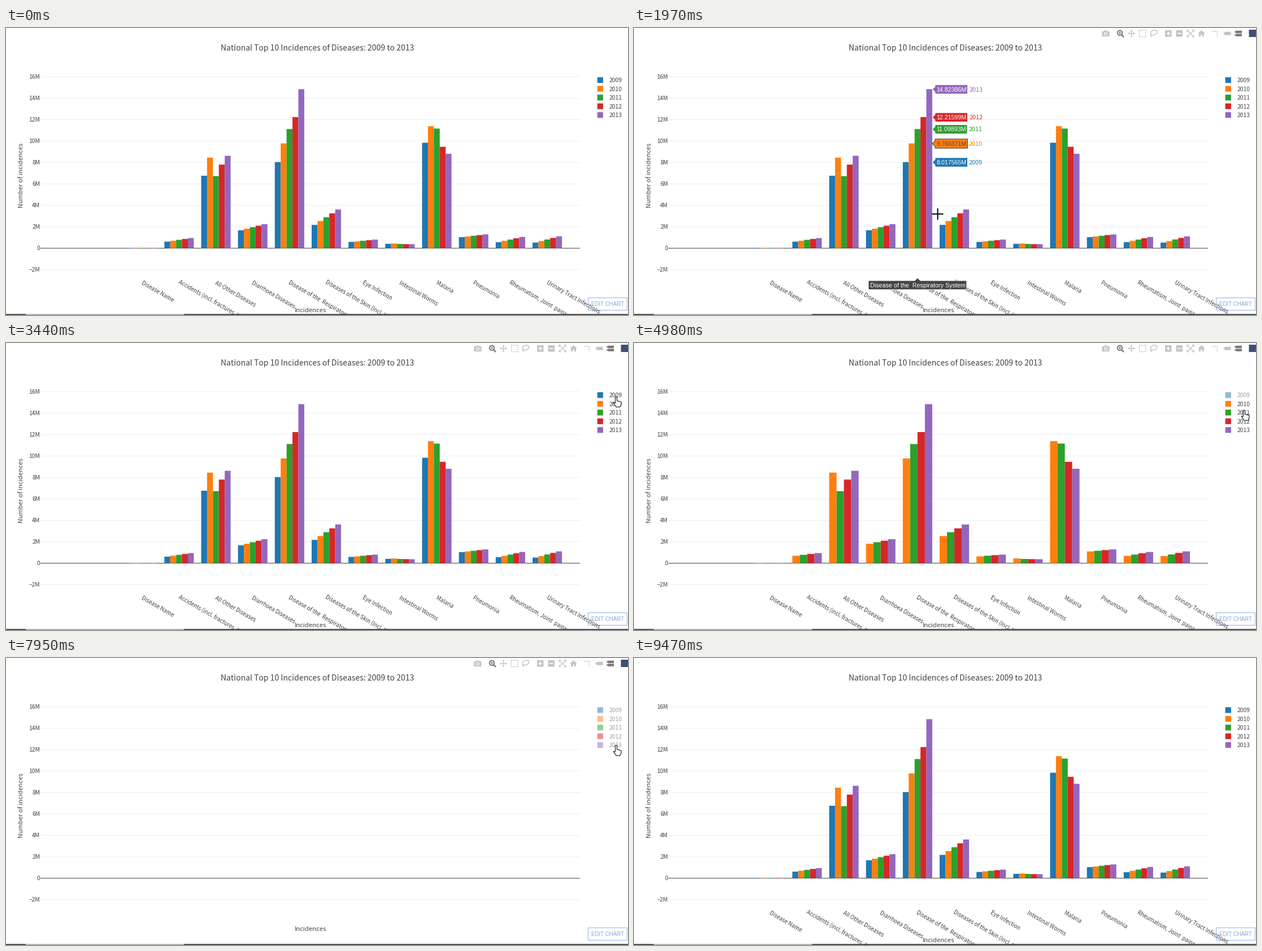
Animation of 1101 by 509 pixels, one loop 9520 ms. Source, as a matplotlib script:

```python
import numpy as np
import matplotlib.pyplot as plt
from matplotlib.animation import FuncAnimation
from matplotlib.patches import Circle, Ellipse, Polygon, Rectangle

W, H, DPI = 1101, 509, 64
LOOP, STEP = 9520, 40
PT = 72 / DPI  # points per pixel
SANS, ARIAL = "Noto Sans CJK JP", "Liberation Sans"
INK, GRAY, DARK = "#444444", "#c4c4c4", "#777777"
plt.rcParams["path.snap"] = False

YEARS = range(2009, 2014)
COLORS = ["#1f77b4", "#ff7f0e", "#2ca02c", "#d62728", "#9467bd"]

# Millions of cases: evenly spaced key readings from the first to the last year.
READINGS = {
    "Disease Name": [.002009, .002013],
    "Accidents (incl. fractures, burns)": [.591306, .921844],
    "All Other Diseases": [6.743128, 8.431507, 6.704392, 7.782615, 8.602943],
    "Diarrhoea Diseases": [1.652147, 2.220863],
    "Disease of the  Respiratory System":
        [8.017565, 9.760371, 11.09893, 12.21599, 14.82386],
    "Diseases of the Skin (Incl. Ulcers)": [2.152718, 3.591426],
    "Eye Infection": [.562853, .781249],
    "Intestinal Worms": [.387066, .419298, .374886, .357844, .349632],
    "Malaria": [9.823741, 11.36582, 11.14396, 9.442817, 8.792564],
    "Pneumonia": [1.013492, 1.262835],
    "Rheumatism, Joint  pains etc": [.541627, 1.024913],
    "Urinary Tract Infections": [.503174, 1.082356],
}
NAMES = list(READINGS)
VALUES = [np.interp(np.linspace(0, 1, 5), np.linspace(0, 1, len(keys)), keys)
          for keys in READINGS.values()]

X0, PITCH, GROUP = 241.2, 65.17, 52.1
Y0, PER_M = 390.5, 19
LEFT, RIGHT, TOP, BOTTOM = 61, 1016, 87, 429
LEGEND_Y, LEGEND_PITCH = 92.3, 15.47

ENTER, LEAVE = 450, 9070
HIDE_AT = [3920, 5140, 5860, 6940, 7950]
RESTORE = 8150
HOVER_LAG = 100

# Pointer over the chart: time, x, y. In the legend it steps down instead.
TOUR = np.array([
    (450, 1070, 500), (900, 515, 238), (1030, 402, 243), (1390, 343, 299),
    (1510, 361, 303), (1710, 361, 303), (2200, 670, 350), (2390, 687, 359),
    (2640, 812, 330), (3440, 1080, 95), (8150, 1080, 155), (8450, 940, 143),
    (8750, 957, 380), (9070, 962, 520),
])
LEGEND_STEPS = [4450, 4900, 6000, 7070, 7950]

HAND = np.array([(-1.5, 0), (1.5, 0), (1.5, 7), (9, 9), (9, 13), (7, 18),
                 (0, 18), (-5, 10.5), (-1.5, 11)])
ARROW = np.array([(0, 0), (0, 15), (4, 12), (10, 11)])

fig = plt.figure(figsize=(W / DPI, H / DPI), dpi=DPI, facecolor="white")
ax = fig.add_axes([0, 0, 1, 1])
ax.set_xlim(0, W)
ax.set_ylim(H, 0)
ax.axis("off")


def text(x, y, s, px, color=INK, font=SANS, z=4, **kw):
    return ax.text(x, y, s, fontsize=px * PT, color=color, family=font,
                   va="baseline", zorder=z, **kw)


def line(xs, ys, color, px=1, z=1, **kw):
    return ax.plot(xs, ys, color=color, lw=px * PT, zorder=z,
                   solid_capstyle="butt", **kw)[0]


def add(kind, *args, fill="none", edge="none", px=0, z=5, **kw):
    return ax.add_patch(kind(*args, fc=fill, ec=edge, lw=px * PT, zorder=z,
                             **kw))


def box(x, y, w, h, fill, z=5, **kw):
    return add(Rectangle, (x, y), w, h, fill=fill, z=z, **kw)


def shape(points, fill, edge="none", px=0, z=5):
    return add(Polygon, points, fill=fill, edge=edge, px=px, z=z,
               joinstyle="miter")


def cross(x, y, r, color, px, z):
    return [line([x - r, x + r], [y, y], color, px, z),
            line([x, x], [y - r, y + r], color, px, z)]


def ypix(v):
    return Y0 - v * PER_M


def center(group):
    return X0 + PITCH * group


def draw_frame_of_chart():
    text(551.5, 39.6, "National Top 10 Incidences of Diseases: 2009 to 2013",
         14, ha="center")
    text(30.5, 261.5, "Number of incidences", 11.3, ha="center", rotation=90,
         rotation_mode="anchor")
    for m in range(-2, 17, 2):
        y = ypix(m)
        line([LEFT, RIGHT], [y, y], "#eeeeee" if m else INK)
        label = f"{m}M".replace("-", "\u2013") if m else "0"
        text(60.3, y + 3.8, label, 10.3, ha="right")
    box(1030.5, 478.5, 69, 22, "none", 3.5, edge="#8fb3e8", px=1)
    text(1065, 493, "EDIT CHART", 9.8, "#7ea6e0", ARIAL, 3.6, ha="center")
    line([0, W], [508, 508], "#2a2a2a", 1.6, 5)
    line([35, 315], [508, 508], "#cfcfcf", 1.6, 5.1)


def hover_tag_icon(x, y, h, color):
    return shape([(x, y), (x + 3.5, y - h), (x + 13.5, y - h),
                  (x + 13.5, y + h), (x + 3.5, y + h)], color)


def draw_modebar():
    y = 9.7
    camera = [box(828.5, 6, 13, 9, GRAY), box(832, 4.5, 6, 2, GRAY),
              add(Circle, (835, 10.3), 2.4, fill=GRAY, edge="white", px=1.2)]
    magnifier = [add(Circle, (860, 8.7), 4.2, edge=DARK, px=2),
                 line([863, 867], [12, 16], DARK, 2.4, 5),
                 *cross(860, 8.7, 2, DARK, 1.3, 6)]
    pan = cross(880.5, y, 5, GRAY, 1.4, 5)
    for angle in np.arange(4) * np.pi / 2:
        u = np.array([np.cos(angle), np.sin(angle)])
        side = 2.4 * u[::-1] * (-1, 1)
        tip = (880.5, y) + 6.5 * u
        pan.append(shape([tip, tip - 2.8 * u + side, tip - 2.8 * u - side],
                         GRAY))
    select = [box(894.5, 4, 11.5, 11.5, "none", edge=GRAY, px=1.5,
                  ls=(0, (1.4, 1))),
              add(Ellipse, (920, 8.3), 12, 8, angle=-20, edge=GRAY, px=1.5),
              line([915, 914.5, 917], [11, 13.5, 15.5], GRAY, 1.5, 5)]
    zoom = [box(940, 4, 11.5, 11.5, GRAY), box(959.5, 4, 11.5, 11.5, GRAY),
            *cross(945.75, y, 3.2, "white", 1.8, 6),
            line([962, 968.5], [y, y], "white", 1.8, 6)]
    autoscale = []
    for dx in (-1, 1):
        autoscale.append(line([985 - 6 * dx, 985 + 6 * dx], [y - 6, y + 6],
                              GRAY, 1.3, 5))
        for dy in (-1, 1):
            cx, cy = 985 + 6 * dx, y + 6 * dy
            autoscale.append(line([cx - 3 * dx, cx, cx], [cy, cy, cy - 3 * dy],
                                  GRAY, 1.3, 5))
    home = [shape([(998, 10), (1004.5, 4), (1011, 10)], GRAY),
            box(1000, 10, 9, 5, GRAY), box(1003.2, 11.5, 2.6, 3.5, "white", 6)]
    spikes = [line([1024, 1032.5, 1032.5], [6, 6, 15], GRAY, 1.6, 5,
                   ls=(0, (1.5, 1)))]
    tags = [hover_tag_icon(1043, y, 3, GRAY),
            hover_tag_icon(1062.5, y - 2.8, 2.2, DARK),
            hover_tag_icon(1062.5, y + 2.8, 2.2, DARK)]
    badge = [box(1088.5, 3, 12.5, 13, "#3f4f75")]
    return [*camera, *magnifier, *pan, *select, *zoom, *autoscale, *home,
            *spikes, *tags, *badge]


def draw_legend():
    items = []
    for i, (year, color) in enumerate(zip(YEARS, COLORS)):
        y = LEGEND_Y + LEGEND_PITCH * i
        items.append((box(1046.7, y - 5, 10.2, 10.2, color),
                      text(1068, y + 3.8, str(year), 10.3)))
    return items


draw_frame_of_chart()
modebar = draw_modebar()
legend = draw_legend()
bars = [[box(0, ypix(v) - .4, 1, v * PER_M + .4, c, 2)
         for v, c in zip(row, COLORS)] for row in VALUES]
ticks = [text(center(g) - 2.5, 453.5, name, 9.8, rotation=-30,
              rotation_mode="anchor") for g, name in enumerate(NAMES)]
x_title = text(539, 504.5, "Incidences", 11.3, ha="center")
live = []


def count_label(v):
    return f"{v:.7g}M" if v >= 1 else f"{v * 1000:.6g}k"


def spread(ys, gap):
    """Shift sorted positions apart so that neighbours keep the gap."""
    blocks = []
    for i, y in enumerate(ys):
        blocks.append([y - i * gap, 1])
        while len(blocks) > 1 and blocks[-1][0] < blocks[-2][0]:
            m, n = blocks.pop()
            p, k = blocks.pop()
            blocks.append([(m * n + p * k) / (n + k), n + k])
    flat = [m for m, n in blocks for _ in range(n)]
    return [m + i * gap for i, m in enumerate(flat)]


def draw_hover(group, shown):
    order = sorted(shown, key=lambda i: -VALUES[group][i])
    tips = [ypix(VALUES[group][i]) for i in order]
    tip_x, half = center(group) + GROUP / 2, 8.2
    left = tip_x + 5
    for i, tip, y in zip(order, tips, spread(tips, 17.1)):
        ink = INK if YEARS[i] == 2010 else "white"
        label = text(left + 2.2, y + 3.8, count_label(VALUES[group][i]), 10.66,
                     ink, ARIAL, 7.5)
        right = left + label.get_window_extent().width + 4.4
        tag = shape([(tip_x, tip), (left, y + 5), (left, y + half),
                     (right, y + half), (right, y - half), (left, y - half),
                     (left, y - 5)], COLORS[i], ink, 1, 7)
        back = box(right, y - half, 27, 2 * half, "white", 6.5, alpha=.8)
        year = text(right + 2.5, y + 3.8, str(YEARS[i]), 10.8, COLORS[i], z=7.5)
        live.extend([label, tag, back, year])

    x = center(group)
    label = text(x, 459.7, NAMES[group], 10.66, "white", ARIAL, 7.5,
                 ha="center")
    w = label.get_window_extent().width / 2 + 2.6
    tag = shape([(x, 443), (x + 5, 448), (x + w, 448), (x + w, 464),
                 (x - w, 464), (x - w, 448), (x - 5, 448)], INK, "white", 1, 7)
    live.extend([label, tag])


def in_legend(t):
    return 3440 <= t <= RESTORE


def pointer(t):
    if in_legend(t):
        glide = np.clip((t - np.array(LEGEND_STEPS)) / 130 + 1, 0, 1)
        return 1080, 95.5 + 11.9 * glide.sum()
    return [np.interp(t, TOUR[:, 0], TOUR[:, k]) for k in (1, 2)]


def in_plot(x, y):
    return LEFT <= x <= RIGHT and TOP <= y <= BOTTOM


def draw_pointer(t):
    x, y = pointer(t)
    if in_plot(x, y):
        live.extend(cross(x, y, 10, "black", 2, 9))
    else:
        outline = HAND if in_legend(t) else ARROW
        live.append(shape(outline + (x, y), "white", "#222222", 1.2, 9))


def update(frame):
    t = frame * STEP + 30
    while live:
        live.pop().remove()

    shown = [i for i in range(5) if t < HIDE_AT[i] or t >= RESTORE]
    width = GROUP / max(len(shown), 1)
    for g, row in enumerate(bars):
        for i, bar in enumerate(row):
            bar.set_visible(i in shown)
            if i in shown:
                bar.set_x(center(g) - GROUP / 2 + shown.index(i) * width)
                bar.set_width(width)
    for i, item in enumerate(legend):
        for part in item:
            part.set_alpha(1 if i in shown else .5)
    for tick in ticks:
        tick.set_visible(bool(shown))
    x_title.set_y(504.5 if shown else 484.5)

    active = ENTER <= t < LEAVE
    for icon in modebar:
        icon.set_visible(active)
    if active:
        hx, hy = pointer(t - HOVER_LAG)
        if shown and in_plot(hx, hy):
            group = int(np.clip(round((hx - X0) / PITCH), 0, len(NAMES) - 1))
            draw_hover(group, shown)
        draw_pointer(t)
    return []


anim = FuncAnimation(fig, update, frames=LOOP // STEP, interval=STEP,
                     init_func=lambda: [], repeat=True, repeat_delay=0,
                     blit=False)
plt.show()
```
